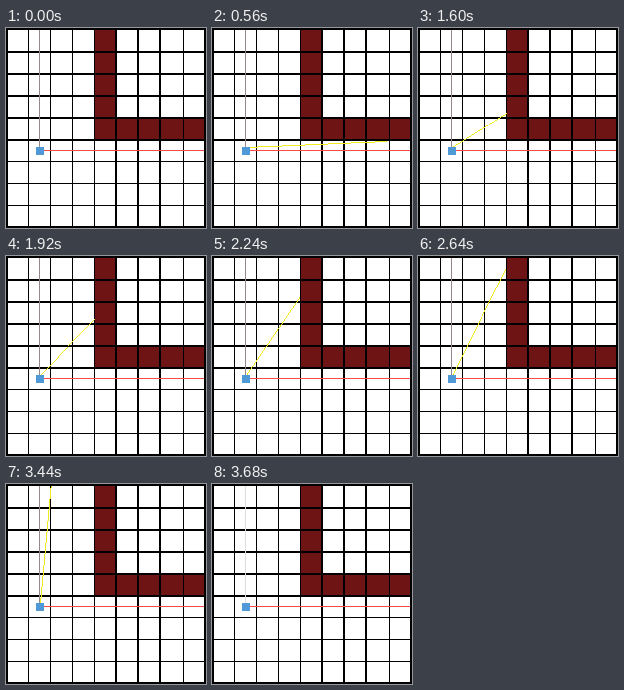
These frames come from a looping animation (200 px wide and 200 px high, 3.76 s). A matplotlib script:

```python
import numpy as np
import matplotlib.pyplot as plt
from matplotlib.animation import FuncAnimation
from matplotlib.colors import to_rgba
from matplotlib.patches import Rectangle

SIZE, DPI = 200, 100
FRAMES, INTERVAL = 47, 80
CELLS = 9

WALL = "#6f1414"
RED = "#ff4848"
YELLOW = "#f2ea20"
BLUE = "#4f9ad6"
GRAY = "#968888"
PALE = "#dedede"

ORIGIN = (34, 119)

# The ray's end slides along these corners, reaching each at the given step.
STEPS = [1, 5, 15, 35, 45]
CORNERS_X = [197, 196, 88, 87, 34]
CORNERS_Y = [122, 113, 113, 2, 2]

fig = plt.figure(figsize=(SIZE / DPI, SIZE / DPI), dpi=DPI, facecolor="white")
ax = fig.add_axes([0, 0, 1, 1])


def box(x, y, w, h, color, z):
    rect = Rectangle((x, y), w, h, facecolor=color, edgecolor="none",
                     linewidth=0, antialiased=False, zorder=z)
    ax.add_patch(rect)
    return rect


# L-shaped wall
box(88, 0, 22, 112, WALL, 1)
box(88, 90, 111, 22, WALL, 1)

# grid, with uneven line weights as if scaled down
for k in range(1, CELLS):
    wide = int(5 <= k <= 7)
    box(int(22.125 * k) - wide, 0, 1 + wide, SIZE, "black", 2)
    box(0, 22 * k + 1, SIZE, 2 if k <= 5 else 1, "black", 2)
for edge in (0, SIZE - 2):
    box(edge, 0, 2, SIZE, "black", 2)
    box(0, edge, SIZE, 2, "black", 2)

# sweep limits and player
box(38, 122, 160, 1, RED, 3)
up_line = box(33, 2, 1, 117, GRAY, 3)
box(30, 119, 8, 8, BLUE, 5)

# pixel layer for the ray
layer = ax.imshow(np.zeros((SIZE, SIZE, 4)), extent=(0, SIZE, SIZE, 0),
                  interpolation="nearest", zorder=4)
ax.set_xlim(0, SIZE)
ax.set_ylim(SIZE, 0)
ax.set_aspect("auto")
ax.axis("off")


def ray_pixels(x, y):
    """A one-pixel line from the origin to (x, y)."""
    x0, y0 = ORIGIN
    count = int(max(abs(x - x0), abs(y - y0))) + 1
    cols = np.rint(np.linspace(x0, x, count)).astype(int)
    rows = np.rint(np.linspace(y0, y, count)).astype(int)
    image = np.zeros((SIZE, SIZE, 4))
    image[rows, cols] = to_rgba(YELLOW)
    return image


def draw(i):
    last = i == FRAMES - 1
    up_line.set_facecolor(PALE if last else GRAY)
    layer.set_visible(0 < i and not last)
    layer.set_data(ray_pixels(np.interp(i, STEPS, CORNERS_X),
                              np.interp(i, STEPS, CORNERS_Y)))
    return layer, up_line


anim = FuncAnimation(fig, draw, frames=FRAMES, interval=INTERVAL,
                     repeat=True, repeat_delay=0, blit=False)
plt.show()
```
